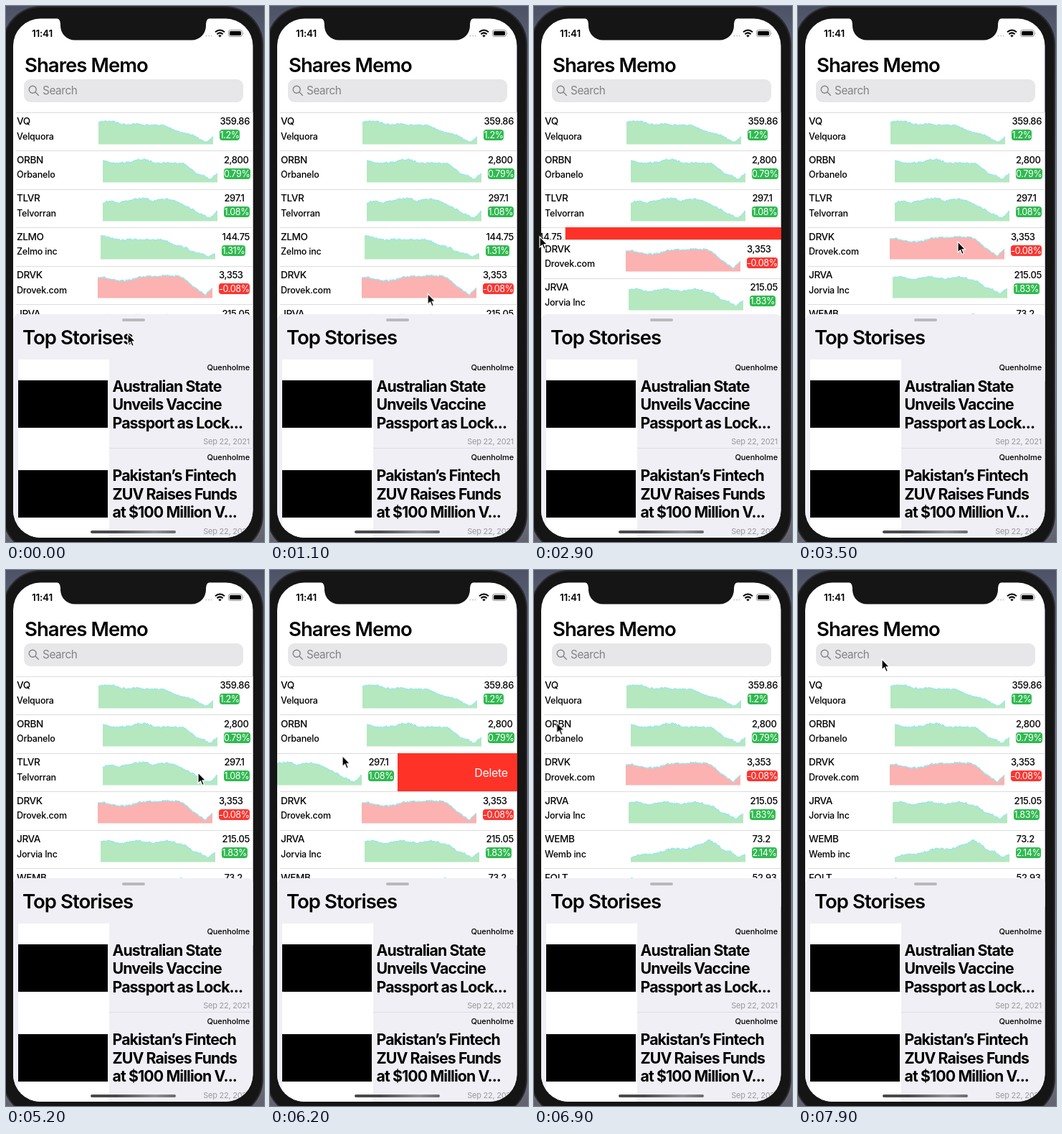
An HTML page that plays this animation: 360x746 px, repeating every 8000 ms.

```html
<!DOCTYPE html>
<html lang="en">
<head>
<meta charset="utf-8">
<title>Share list with swipe to delete</title>
<style>
  html, body { margin: 0; width: 100%; height: 100%; overflow: hidden; }
  body { font-family: Inter, "Liberation Sans", sans-serif; color: #000; }
  #stage { position: relative; width: 360px; height: 746px; overflow: hidden;
    background: linear-gradient(#4d5266 0, #8a8a9c 30%, #a09fb0 70%, #62626f 100%); }
  #stage div, #stage span, #stage svg { position: absolute; }
  #stage span { line-height: 20px; white-space: nowrap; }

  .body { left: -5px; top: 0; width: 364px; height: 762px; box-sizing: border-box;
    border: 2px solid #2b2b2e; border-radius: 54px; background: #151516; }
  .screen { inset: 0; background: #fff; clip-path: inset(17.5px 15.5px 6px 10px round 38px); }
  .clock { left: 36px; top: 28px; font-size: 13.5px; font-weight: 600; letter-spacing: -.2px; }
  .title { font-size: 27.5px; font-weight: 600; letter-spacing: -.95px; }
  .search { left: 25px; top: 102px; width: 306px; height: 32px; border-radius: 9px; background: #e7e7e9; }
  .search span { left: 26px; top: 6px; font-size: 15.3px; letter-spacing: -.4px; color: #828287; }

  .list { left: 9.5px; top: 147.5px; width: 335.5px; }
  #stage .row { position: relative; height: 53.5px; overflow: hidden; background: #fff; }
  .slide { inset: 0 auto auto 0; width: 335.5px; height: 53.5px; }
  .slide::before { content: ""; position: absolute; left: 4.5px; right: 0; top: 0; height: 1px; background: #dcdcde; }
  .ticker { left: 5.5px; top: 2.5px; font-size: 13.6px; font-weight: 450; letter-spacing: -.4px; }
  .name { left: 5.5px; top: 24px; font-size: 12.5px; font-weight: 450; letter-spacing: -.2px; }
  .price { top: 2.5px; font-size: 13px; font-weight: 450; letter-spacing: -.4px; }
  #stage .badge { top: 24.5px; height: 15px; line-height: 15px; border-radius: 4px; color: #fff;
    margin-left: -.5px; padding: 0 .5px; font-size: 12.7px; letter-spacing: -.4px; background: #30b950; }
  #stage .down .badge { background: #fb3530; }
  .chart { top: 0; width: 161px; height: 53px; overflow: visible; }
  .chart .area { fill: #b5e8bf; }
  .down .area { fill: #fbb2b1; }
  .chart .line { fill: none; stroke: #98e6ee; stroke-width: 1.3; }
  .delete { left: 335.5px; top: 0; width: 335.5px; height: 53.5px; background: #ff3228; }
  .delete span { left: 0; top: 17px; font-size: 16px; letter-spacing: -.3px; color: #fff; }

  .sheet { left: 9.5px; top: 428.5px; width: 335.5px; height: 320px; border-radius: 8px 8px 0 0; background: #f0eff5; }
  .grip { left: 162px; top: 434.5px; width: 32px; height: 4.5px; border-radius: 3px; background: #b9b9bd; }
  .story { left: 17px; width: 328px; height: 124.5px; }
  .thumb { left: 0; top: 0; width: 126.5px; height: 124.5px; background: #fff; }
  .logo { left: 0; top: 29.5px; width: 125px; height: 66px; background: #000; }
  .rule { left: 127px; right: 0; bottom: 0; height: 1px; background: #dedde3; }
  .source { right: 5px; top: 1.5px; font-size: 11px; font-weight: 500; letter-spacing: -.1px; }
  #stage .head { left: 131.5px; top: 25px; font-size: 21.3px; line-height: 25.5px; font-weight: 700; letter-spacing: -.9px; }
  .date { right: 5px; top: 104.5px; font-size: 11px; letter-spacing: -.25px; color: #98989d; }
  .home { left: 118px; top: 729.5px; width: 119px; height: 4.5px; border-radius: 3px;
    background: linear-gradient(90deg, #4a4a4c 30%, #929296 75%, #6a6a6d); }
  .icons { left: 0; top: 0; width: 360px; height: 60px; }
  .cursor { left: -1.5px; top: -2px; width: 16px; height: 22px; animation: cursor 8s infinite; }

  .first { animation: collapse1 8s infinite; }
  .first .slide { animation: slide1 8s linear infinite; }
  .first .delete span { animation: label1 8s linear infinite; }
  .second { animation: collapse2 8s infinite; }
  .second .slide { animation: slide2 8s linear infinite; }
  .second .delete span { animation: label2 8s linear infinite; }

  @keyframes collapse1 {
    0%, 34% { height: 53.5px; animation-timing-function: ease-in-out; }
    37.75%, 100% { height: 0; }
  }
  @keyframes slide1 {
    0%, 27.25% { transform: none; }
    33.1% { transform: translateX(-200px); }
    36.25% { transform: translateX(-301px); }
    37.75%, 100% { transform: translateX(-335.5px); }
  }
  @keyframes label1 {
    0%, 29.4% { transform: translateX(14px); }
    33.1% { transform: translateX(140px); }
    36.25% { transform: translateX(52px); }
    37.25%, 100% { transform: translateX(14px); }
  }
  @keyframes collapse2 {
    0%, 79.2% { height: 53.5px; animation-timing-function: ease-in-out; }
    82.95%, 100% { height: 0; }
  }
  @keyframes slide2 {
    0%, 71.25% { transform: none; }
    78.75% { transform: translateX(-200px); }
    81.25% { transform: translateX(-283px); }
    83%, 100% { transform: translateX(-335.5px); }
  }
  @keyframes label2 {
    0%, 74% { transform: translateX(14px); }
    78.75% { transform: translateX(140px); }
    81.25% { transform: translateX(52px); }
    82%, 100% { transform: translateX(14px); }
  }
  @keyframes cursor {
    0%, 5% { transform: translate(169px, 456px); animation-timing-function: ease-in-out; }
    22.5%, 27.25% { transform: translate(269px, 345px); animation-timing-function: linear; }
    33.1% { transform: translate(69px, 328px); animation-timing-function: ease-out; }
    36.25% { transform: translate(7px, 321px); animation-timing-function: ease-in-out; }
    43.75% { transform: translate(222px, 328px); animation-timing-function: ease-in-out; }
    62%, 71.25% { transform: translate(267px, 282px); animation-timing-function: linear; }
    78.75% { transform: translate(67px, 254px); animation-timing-function: ease-out; }
    81.25% { transform: translate(-2px, 246px); animation-timing-function: ease-in-out; }
    95%, 100% { transform: translate(116px, 124px); }
  }
</style>
</head>
<body>
<div id="stage">
  <div class="body"></div>
  <div class="screen">
    <span class="clock">11:41</span>
    <span class="title" style="left:26px;top:72px">Shares Memo</span>
    <div class="search">
      <svg style="left:6px;top:8px" width="16" height="16" fill="none" stroke="#828287" stroke-width="1.4" stroke-linecap="round">
        <circle cx="6.2" cy="6.2" r="5"/><path d="M10 10L14.3 14.3"/>
      </svg>
      <span>Search</span>
    </div>
    <div class="list" id="list"></div>
    <div class="sheet"></div>
    <div class="grip"></div>
    <span class="title" style="left:23px;top:451px">Top Storises</span>
    <div id="stories"></div>
    <div class="home"></div>
  </div>
  <svg class="icons">
    <path fill="#151516" d="M68 16Q76 17 76 25V27.5A20 20 0 0 0 96 47.5H259A20 20 0 0 0 279 27.5V25Q279 17 287 16Z"/>
    <g fill="#c4c4c6"><circle cx="279.5" cy="41.5" r="1"/><circle cx="283" cy="41.5" r="1"/><circle cx="286.5" cy="41.5" r="1"/></g>
    <g fill="none" stroke="#000" stroke-width="2">
      <path d="M292 36.3Q298.5 30.6 305 36.3M294.4 39.2Q298.5 35.6 302.6 39.2"/>
    </g>
    <path d="M296.3 41.2Q298.5 39.2 300.7 41.2L298.5 43.5Z"/>
    <rect x="310.5" y="33.5" width="19" height="9" rx="2.7" fill="none" stroke="#8b8b8d"/>
    <rect x="312" y="35" width="16" height="6" rx="1.5"/>
    <path d="M331 36.5Q332.6 38 331 39.5Z" fill="#8b8b8d"/>
  </svg>
  <svg class="cursor">
    <path d="M2 2V17L5.5 13.8L7.9 19.5L10.4 18.4L8 12.9H12.6Z" stroke="#fff" stroke-width="1.2"/>
  </svg>
</div>
<script>
  // ticker, name, price, change, left edge of the figures, chart heights every 10px, class
  const shares = [
    ["VQ", "Velquora", "359.86", "1.2%", 298.5, "14 12 12 16 17 16 17 18 18 18 22 26 29 31 37 42 33", ""],
    ["ORBN", "Orbanelo", "2,800", "0.79%", 304, "15 17 18 17 16 13 13 16 18 17 18 17 23 32 35 41 31", ""],
    ["TLVR", "Telvorran", "297.1", "1.08%", 304.5, "19 16 20 17 15 13 13 17 15 13 16 20 25 31 36 40 30", "second"],
    ["ZLMO", "Zelmo inc", "144.75", "1.31%", 301.5, "12 13 17 18 17 17 17 18 17 18 23 26 29 35 37 41 36", "first"],
    ["DRVK", "Drovek.com", "3,353", "-0.08%", 297, "15 16 19 21 20 18 15 14 14 13 13 14 16 26 33 40 30", "down"],
    ["JRVA", "Jorvia Inc", "215.05", "1.83%", 301.5, "17 14 18 19 17 14 16 18 17 15 16 19 22 30 33 39 31", ""],
    ["WEMB", "Wemb inc", "73.2", "2.14%", 304.5, "39 34 34 34 31 28 25 27 26 22 19 14 20 29 30 38 35", ""],
    ["FOLT", "Folt inc", "52.93", "1.47%", 304.5, "14 17 20 22 21 23 24 22 25 26 28 27 30 33 35 38 36", ""]
  ];
  const stories = [
    "Australian State<br>Unveils Vaccine<br>Passport as Lock...",
    "Pakistan’s Fintech<br>ZUV Raises Funds<br>at $100 Million V..."
  ];

  let seed = 7;
  const random = () => (seed = seed * 16807 % 2147483647) / 2147483647;

  function chart(heights, left) {
    const y = heights.split(" ").map(Number);
    const points = [];
    for (let x = 0; x <= 160; x += 1.6) {
      const i = Math.min(Math.floor(x / 10), y.length - 2);
      const base = y[i] + (y[i + 1] - y[i]) * (x / 10 - i);
      points.push(x.toFixed(1) + " " + (base + random() * 2.4 - 1.2).toFixed(1));
    }
    const line = "M" + points.join("L");
    return `<svg class="chart" style="left:${left}px">
      <path class="area" d="${line}V44.5H0Z"/><path class="line" d="${line}"/></svg>`;
  }

  document.getElementById("list").innerHTML = shares.map(
    ([ticker, name, price, change, edge, heights, kind]) => {
      const x = edge - 9.5;
      return `<div class="row ${kind}"><div class="slide">
        <span class="ticker">${ticker}</span><span class="name">${name}</span>
        ${chart(heights, x - 169.5)}
        <span class="price" style="left:${x}px">${price}</span>
        <span class="badge" style="left:${x}px">${change}</span>
        <div class="delete"><span>Delete</span></div>
      </div></div>`;
    }).join("");

  document.getElementById("stories").innerHTML = stories.map((head, i) =>
    `<div class="story" style="top:${491.5 + i * 124.5}px">
      <div class="thumb"></div><div class="logo"></div><div class="rule"></div>
      <span class="source">Quenholme</span><span class="head">${head}</span>
      <span class="date">Sep 22, 2021</span>
    </div>`).join("");
</script>
</body>
</html>
```
